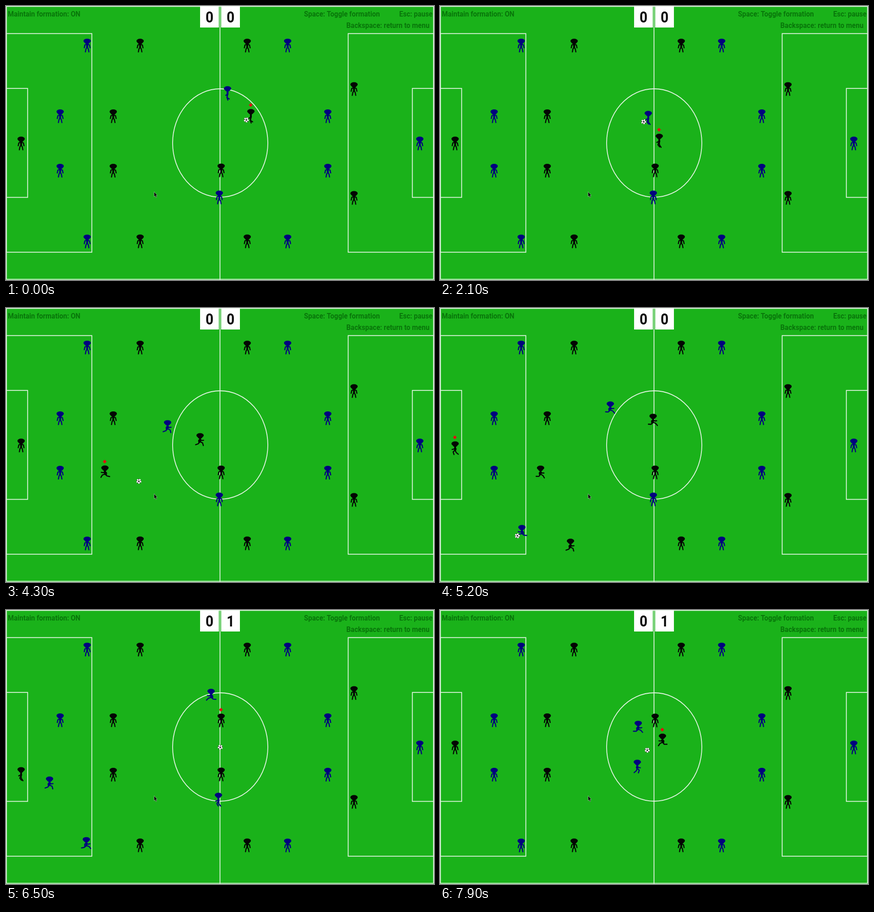
Write an HTML page with a canvas that moves like this. It is 935 px wide and 599 px high and loops after 8 s.

```html
<!DOCTYPE html>
<html lang="en">
<head>
<meta charset="utf-8">
<title>Football match</title>
<style>
html, body { margin: 0; width: 100%; height: 100%; overflow: hidden; background: #1ab21a; }
canvas { display: block; }
</style>
</head>
<body>
<canvas id="stage" width="935" height="599"></canvas>
<script>
const ctx = document.getElementById('stage').getContext('2d');
const LOOP = 8000, GOAL = 6400;
const SPEED = 0.066;   // pixels per ms on the way back home
const STRIDE = 680;    // ms per step
const ASPECT = 0.88;   // the whole stage is narrowed, letters included
const MIDDLE = 300.4;

// Formation: each pair stands symmetrically around the middle of the pitch.
const pair = (x, dy) => [[x, MIDDLE - dy], [x, MIDDLE + dy]];
const team = (color, spots) => spots.map(home => ({ color, home }));
const blacks = team('#040604', [[33, MIDDLE], ...pair(234.3, 59.5), ...pair(293, 214),
  ...pair(527, 214), ...pair(470, 59), ...pair(760.3, 119)]);
const blues = team('#02027e', [[904, MIDDLE], ...pair(703, 59.5), ...pair(615.3, 214.2),
  ...pair(177.3, 214.2), ...pair(118.3, 59.5), ...pair(466, 118)]);
const players = [...blacks, ...blues];

const [keeper, , midfielder, , winger, , , striker, partner] = blacks;
const [, , , , , , outside, , finisher, forward, support] = blues;

// A run leaves home at `start`, passes timed points and returns home.
function run(player, start, ...points) {
  const [t, x, y] = points[points.length - 1];
  const [hx, hy] = player.home;
  const arrival = t + Math.hypot(hx - x, hy - y) / SPEED;
  player.track = [[start, hx, hy], ...points, [arrival, hx, hy]];
}

run(striker, -STRIDE, [0, 535, 240], [1100, 522, 281], [3100, 436, 307], [3630, 393, 320]);
run(forward, -STRIDE, [0, 484, 190], [1100, 464, 231], [3100, 446, 257], [3600, 407, 259],
  [4300, 353, 260], [5200, 372, 219], [6500, 448, 187], [7900, 433, 257]);
run(midfielder, 4030, [4720, 188, 358]);
run(winger, 4980, [5200, 285, 519]);
run(outside, 4830, [5200, 179, 489], [6000, 160, 482]);
run(keeper, 5080, [GOAL, 33, 365]);
run(finisher, 5600, [GOAL, 90, 383]);
run(support, 6420, [7900, 431, 342]);
run(partner, 6750, [7900, 486, 285]);

const controlled = [[0, striker], [3630, midfielder], [4720, winger], [5080, keeper],
  [GOAL, striker], [6750, partner]];

function locate({ home, track }, t) {
  const next = track ? track.findIndex(key => key[0] > t) : -1;
  if (next < 1) return { x: home[0], y: home[1], face: 1, moving: false };
  const [t0, x0, y0] = track[next - 1], [t1, x1, y1] = track[next];
  const k = (t - t0) / (t1 - t0);
  return {
    x: x0 + (x1 - x0) * k,
    y: y0 + (y1 - y0) * k,
    face: x1 > x0 ? 1 : -1,
    moving: true
  };
}

// The ball stays at a player's feet, or travels straight between two anchors.
const feet = player => t => {
  const { x, y } = locate(player, t);
  return [x - 10, y + 9];
};
const spot = (x, y) => () => [x, y];
const atStriker = feet(striker), atForward = feet(forward), atOutside = feet(outside);
const kickoff = spot(468, 300);
const touches = [[0, atStriker], [820, atStriker], [1400, atForward], [3600, atForward],
  [5100, atOutside], [5600, atOutside], [6050, feet(finisher)], [GOAL, spot(2, 374)],
  [GOAL, kickoff], [7500, kickoff], [LOOP, spot(449, 308)]];

function locateBall(t) {
  const next = touches.findIndex(touch => touch[0] > t);
  const [t0, from] = touches[next - 1], [t1, to] = touches[next];
  if (from === to) return from(t);
  const [x0, y0] = from(t0), [x1, y1] = to(t1);
  const k = (t - t0) / (t1 - t0);
  return [x0 + (x1 - x0) * k, y0 + (y1 - y0) * k];
}

function polyline(...points) {
  ctx.beginPath();
  points.forEach(([x, y]) => ctx.lineTo(x, y));
  ctx.stroke();
}

function oval(x, y, rx, ry = rx) {
  ctx.beginPath();
  ctx.ellipse(x, y, rx, ry, 0, 0, Math.PI * 2);
}

function disc(color, ...shape) {
  ctx.fillStyle = color;
  oval(...shape);
  ctx.fill();
}

// A two-part limb from a joint; angles are measured from straight down.
function limb(x, y, a, b, length) {
  const kx = x + length * Math.sin(a), ky = y + length * Math.cos(a);
  polyline([x, y], [kx, ky], [kx + length * Math.sin(b), ky + length * Math.cos(b)]);
}

function drawPlayer(player, t) {
  const { x, y, face, moving } = locate(player, t);
  ctx.save();
  ctx.translate(x, y);
  ctx.scale(face, 1);
  ctx.strokeStyle = player.color;
  ctx.lineCap = ctx.lineJoin = 'round';
  disc(player.color, 0, -9.8, 8, 5);
  disc(player.color, 0, -7, 5.5, 4);
  ctx.lineWidth = 4;
  polyline([0, -3], [0, 3]);
  ctx.lineWidth = 2.4;
  const phase = moving ? (t - player.track[0][0]) * Math.PI / STRIDE : 0;
  for (const side of [-1, 1]) {
    if (moving) {
      const swing = side * Math.sin(phase);
      const thigh = swing * 1.1 + 0.2;
      const lift = Math.max(0, side * Math.cos(phase));
      limb(0, 4, thigh, thigh - 0.5 - 0.7 * lift, 6);
      limb(0, -2, -swing * 0.9, 0.9 - swing * 0.9, 4.5);
    } else {
      polyline([side, -2.5], [side * 5, -1], [side * 6.3, 5]);
      polyline([0, 3], [side * 2.7, 8], [side * 3.8, 14]);
    }
  }
  ctx.restore();
}

function drawBall(t) {
  const [x, y] = locateBall(t);
  ctx.save();
  ctx.translate(x, y);
  ctx.rotate((x + y) / 6);
  disc('#fff', 0, 0, 5.3);
  disc('#111', 0, 0, 1.7);
  for (let i = 0; i < 5; i++) {
    const a = i * Math.PI * 0.4;
    disc('#111', 4.3 * Math.cos(a), 4.3 * Math.sin(a), 1.1);
  }
  ctx.restore();
}

function drawMarker(t) {
  const [, player] = controlled.filter(([start]) => start <= t).pop();
  const { x, y } = locate(player, t);
  ctx.save();
  ctx.translate(x - 0.5, y - 23.5);
  ctx.rotate(Math.PI / 4);
  ctx.fillStyle = '#e01010';
  ctx.fillRect(-3, -3, 6, 6);
  ctx.restore();
}

function drawPitch() {
  ctx.fillStyle = '#1ab21a';
  ctx.fillRect(0, 0, 935, 599);
  ctx.strokeStyle = '#e0f4e0';
  ctx.lineWidth = 1.8;
  ctx.strokeRect(1, 1, 933, 596.5);
  for (const [width, height] of [[186.5, 478], [46.3, 238.2]]) {
    const top = 299.3 - height / 2;
    ctx.strokeRect(1, top, width, height);
    ctx.strokeRect(934 - width, top, width, height);
  }
  polyline([467.5, 0], [467.5, 599]);
  oval(468, 299.5, 104, 118.5);
  ctx.stroke();
}

function label(text, x, y) {
  ctx.save();
  ctx.translate(x, y);
  ctx.scale(ASPECT, 1);
  ctx.fillText(text, 0, 0);
  ctx.restore();
}

function drawHud(t) {
  ctx.font = 'bold 17.1px Roboto, sans-serif';
  ctx.textAlign = 'left';
  ctx.fillStyle = '#08750a';
  label('Maintain formation: ON', 4, 23.2);
  label('Space: Toggle formation', 651, 23.2);
  label('Esc: pause', 859, 23.2);
  label('Backspace: return to menu', 743.5, 48);

  ctx.font = 'bold 34px Roboto, sans-serif';
  ctx.textAlign = 'center';
  [0, t < GOAL ? 0 : 1].forEach((score, i) => {
    const x = 424 + i * 46;
    ctx.fillStyle = '#fff';
    ctx.fillRect(x, 0.5, 41, 46.5);
    ctx.fillStyle = '#080808';
    label(score, x + 20.5, 36);
  });
}

function drawCursor() {
  ctx.fillStyle = '#080808';
  ctx.strokeStyle = '#b9d8b9';
  ctx.lineWidth = 0.6;
  ctx.beginPath();
  [[0, 0], [0, 11], [2.4, 9], [4, 13], [5.8, 12], [4.2, 8.3], [7, 8]]
    .forEach(([x, y]) => ctx.lineTo(323.5 + x, 406 + y));
  ctx.closePath();
  ctx.fill();
  ctx.stroke();
}

function draw() {
  const t = performance.now() % LOOP;
  drawPitch();
  drawHud(t);
  players.forEach(player => drawPlayer(player, t));
  drawBall(t);
  drawMarker(t);
  drawCursor();
  requestAnimationFrame(draw);
}
draw();
</script>
</body>
</html>
```
